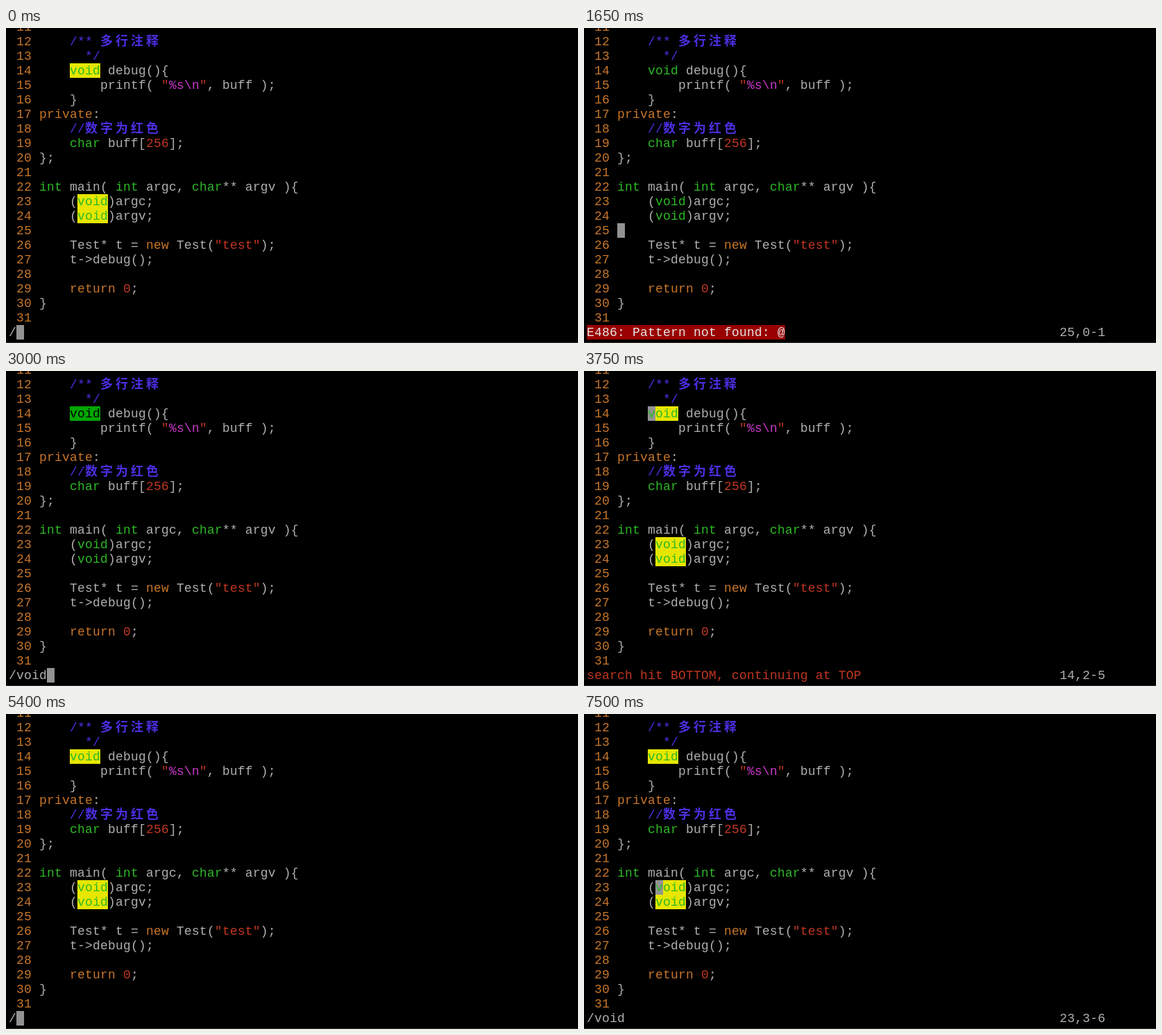
Write an HTML page that moves like this. It is 825 px wide and 455 px high and loops after 8 s.

```html
<!DOCTYPE html>
<html lang="zh">
<head>
<meta charset="utf-8">
<title>Vim search</title>
<style>
  html, body { margin: 0; width: 100%; height: 100%; overflow: hidden; background: #000; }
  svg { display: block; }
  text { font: 18px "Liberation Mono", "Courier New", monospace; letter-spacing: .2px; white-space: pre; }
  text.cjk { font: 700 18px "Noto Sans CJK SC", "Noto Sans CJK", sans-serif; letter-spacing: 4px; }
</style>
</head>
<body>
<svg id="stage" width="825" height="455" viewBox="0 0 825 455">
  <rect width="825" height="455" fill="#000"/>
  <g id="marks"></g>
  <g id="code"></g>
  <g id="live"></g>
  <rect y="454" width="825" height="1" fill="#2b2b2b"/>
  <rect id="flash" width="825" height="455" fill="#bebebe" fill-opacity=".19"/>
</svg>
<script>
const CELL_W = 11, CELL_H = 21, LEFT = 4, TOP_LINE = 12, TOP_Y = 9;
const CMD = 32;      // row of the command line
const GUTTER = 4;    // columns taken by line numbers
const LOOP = 8000;

const INK = {
  w: '#b0b0b0', o: '#c8762a', g: '#2db926', r: '#c23621',
  b: '#4b2fe2', m: '#cd38cd', k: '#000', e: '#e6e6e6'
};
const YELLOW = '#e6e600', GREEN = '#00a600', ERROR = '#990000', CURSOR = '#929292';

// Each run is "colour key + text"; the number is the starting code column.
const CODE = {
  12: [4, 'b/** ', 'b多行注释'],
  13: [6, 'b*/'],
  14: [4, 'gvoid', 'w debug(){'],
  15: [8, 'wprintf( ', 'r"', 'm%s\\n', 'r"', 'w, buff );'],
  16: [4, 'w}'],
  17: [0, 'oprivate', 'w:'],
  18: [4, 'b//', 'b数字为红色'],
  19: [4, 'gchar', 'w buff[', 'r256', 'w];'],
  20: [0, 'w};'],
  22: [0, 'gint', 'w main( ', 'gint', 'w argc, ', 'gchar', 'w** argv ){'],
  23: [4, 'w(', 'gvoid', 'w)argc;'],
  24: [4, 'w(', 'gvoid', 'w)argv;'],
  26: [4, 'wTest* t = ', 'onew', 'w Test(', 'r"test"', 'w);'],
  27: [4, 'wt->debug();'],
  29: [4, 'oreturn', 'w ', 'r0', 'w;'],
  30: [0, 'w}']
};

// Line and code column of every "void"
const MATCHES = [[14, 4], [23, 5], [24, 5]];

const error = (cursor, ruler) => ({ error: 'E486: Pattern not found: @', cursor, ruler });
const prompt = (typed, opts) => ({ cmd: '/' + typed, typing: true, ...opts });
const found = { warn: 'search hit BOTTOM, continuing at TOP', hl: true, cursor: [14, 4], ruler: '14,2-5' };

const SCENES = [
  [0, prompt('', { hl: true })],
  [300, prompt('@', { hl: true })],
  [450, error([24, 5], '24,3-6')],
  [1650, error([25, 0], '25,0-1')],
  [1950, error([26, 5], '26,3-6')],
  [2100, error([27, 5], '27,3-6')],
  [2400, prompt('')],
  [2700, prompt('v', { hit: MATCHES[0] })],
  [2850, prompt('voi', { hit: MATCHES[0] })],
  [3000, prompt('void', { hit: MATCHES[0] })],
  [3750, found],
  [5250, { ...found, flash: true }],
  [5400, prompt('', { hl: true })],
  [6150, prompt('vo', { hl: true, hit: MATCHES[1] })],
  [6300, prompt('voi', { hl: true, hit: MATCHES[1] })],
  [6450, prompt('void', { hl: true, hit: MATCHES[1] })],
  [7500, { cmd: '/void', hl: true, cursor: [23, 5], ruler: '23,3-6' }]
];

const byId = id => document.getElementById(id);
const marks = byId('marks'), code = byId('code'), live = byId('live'), flash = byId('flash');
const xOf = col => LEFT + col * CELL_W;
const yOf = line => TOP_Y + (line - TOP_LINE) * CELL_H;
const isWide = s => s.charCodeAt(0) > 0x2e80;

function add(parent, tag, attrs) {
  const el = document.createElementNS('http://www.w3.org/2000/svg', tag);
  for (const name in attrs) el.setAttribute(name, attrs[name]);
  return parent.appendChild(el);
}

function block(parent, line, col, cells, fill) {
  add(parent, 'rect', { x: xOf(col), y: yOf(line), width: cells * CELL_W, height: CELL_H, fill });
}

function write(parent, line, col, str, ink) {
  const wide = isWide(str);
  const el = add(parent, 'text', { x: xOf(col), y: yOf(line) + 16, fill: INK[ink] });
  if (wide) el.setAttribute('class', 'cjk');
  el.textContent = str;
  return col + str.length * (wide ? 2 : 1);
}

function drawCode() {
  for (let line = 11; line <= 31; line++) {
    write(code, line, 1, String(line), 'o');
    const [start, ...runs] = CODE[line] || [0];
    let col = GUTTER + start;
    for (const run of runs) col = write(code, line, col, run.slice(1), run[0]);
  }
}

function drawScene(s) {
  marks.replaceChildren();
  live.replaceChildren();
  if (s.hl) for (const [line, col] of MATCHES) block(marks, line, GUTTER + col, 4, YELLOW);
  if (s.cursor) block(marks, s.cursor[0], GUTTER + s.cursor[1], 1, CURSOR);
  if (s.hit) {
    const [line, col] = s.hit, part = s.cmd.slice(1);
    block(live, line, GUTTER + col, part.length, GREEN);
    write(live, line, GUTTER + col, part, 'k');
  }
  if (s.error) {
    block(live, CMD, 0, s.error.length, ERROR);
    write(live, CMD, 0, s.error, 'e');
  }
  if (s.warn) write(live, CMD, 0, s.warn, 'r');
  if (s.cmd) write(live, CMD, 0, s.cmd, 'w');
  if (s.typing) block(live, CMD, s.cmd.length, 1, CURSOR);
  if (s.ruler) write(live, CMD, 62, s.ruler, 'w');
  flash.style.display = s.flash ? '' : 'none';
}

let shown = null;
function render(ms) {
  const t = ms % LOOP;
  let scene = SCENES[0][1];
  for (const [start, next] of SCENES) if (t >= start) scene = next;
  if (scene !== shown) drawScene(shown = scene);
}

drawCode();
const origin = performance.now();
render(0);
requestAnimationFrame(function tick(now) {
  render(Math.max(0, now - origin));
  requestAnimationFrame(tick);
});
</script>
</body>
</html>
```
